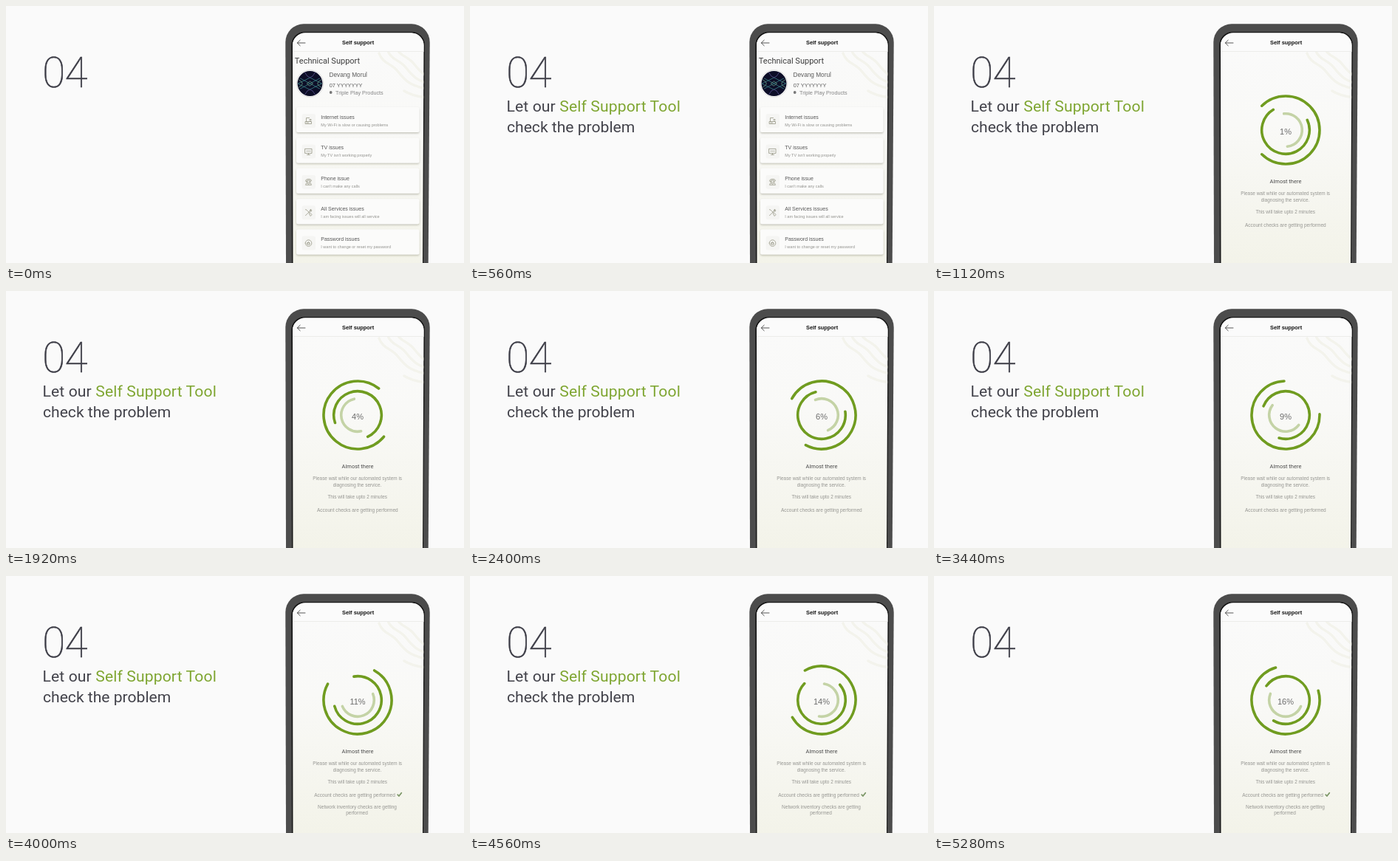
Recreate the animation shown at these times as an HTML page. Size 620x348 px, loop 5360 ms.

```html
<!DOCTYPE html>
<html lang="en">
<head>
<meta charset="utf-8">
<title>Self support</title>
<style>
  html, body { margin: 0; width: 100%; height: 100%; overflow: hidden; background: #fafafa; }
  svg { display: block; width: 620px; height: 348px; }
  .display { font-family: Roboto, sans-serif; }
  .ui { font-family: "Liberation Sans", Arial, sans-serif; }
  .mid { text-anchor: middle; }
  .line { fill: none; stroke-linecap: round; stroke-linejoin: round; }
</style>
</head>
<body>
<svg viewBox="0 0 620 348" xmlns="http://www.w3.org/2000/svg">
  <defs>
    <linearGradient id="paper" x1="0" y1="0" x2="0" y2="1">
      <stop offset="0" stop-color="#fafafa"/>
      <stop offset=".4" stop-color="#f9f9f7"/>
      <stop offset="1" stop-color="#f3f3e9"/>
    </linearGradient>
    <filter id="shadow" x="-10%" y="-20%" width="120%" height="160%">
      <feDropShadow dx="0" dy="1.4" stdDeviation="1.1" flood-color="#55553c" flood-opacity=".34"/>
    </filter>
    <clipPath id="screen"><path d="M388.500 348L388 53A17 17 0 0 1 405 36.500H549A17 17 0 0 1 565.500 53L564 348Z"/></clipPath>
  </defs>

  <text class="display" x="49.300" y="109.600" font-size="56.500" font-weight="100" letter-spacing="-.8" fill="#3c3c46" stroke="#3c3c46" stroke-width=".6">04</text>
  <g id="headline" class="display" font-size="21.100" fill="#43434b">
    <text x="49.500" y="142.500" letter-spacing=".13">Let our <tspan fill="#7fa632">Self Support Tool</tspan></text>
    <text x="50" y="170.500">check the problem</text>
  </g>

  <path d="M379 348L378.300 49A24.700 24.700 0 0 1 403 24.300H549A24.700 24.700 0 0 1 573.700 49L571.700 348Z" fill="#4c4c4c"/>
  <path d="M387 348L386.300 53A18 18 0 0 1 404.300 35H549A18 18 0 0 1 567 53L565 348Z" fill="#161616"/>
  <g clip-path="url(#screen)">
    <rect x="386" y="36" width="182" height="312" fill="url(#paper)"/>
    <g id="waves" class="line" stroke="#f3f3ec" stroke-width="3.400"></g>
    <g id="list"></g>
    <g id="progress">
      <path id="outer" class="line" stroke="#709c20" stroke-width="3.600"/>
      <path id="middle" class="line" stroke="#709c20" stroke-width="3.600"/>
      <path id="inner" class="line" stroke="#c4d3a6" stroke-width="3.600"/>
      <text id="percent" class="ui mid" x="476" y="174.200" font-size="11" fill="#6a6a6a"></text>
      <text class="display mid" x="476" y="240.400" font-size="7.500" fill="#4a4a4a">Almost there</text>
      <g class="ui mid" font-size="6.420" fill="#969692">
        <text x="475.700" y="256">Please wait while our automated system is</text>
        <text x="475.500" y="264.800">diagnosing the service.</text>
        <text x="475.700" y="280.500">This will take upto 2 minutes</text>
        <text id="account" y="298.500" font-size="6.520">Account checks are getting performed</text>
        <g id="network">
          <path class="line" d="M530.200 296.200L531.900 298L535.300 293.800" stroke="#7c9767" stroke-width="1.800"/>
          <text x="475.500" y="314.500" font-size="6.520">Network inventory checks are getting</text>
          <text x="475" y="323.300" font-size="6.520">performed</text>
        </g>
      </g>
    </g>
    <rect x="386" y="36" width="182" height="25.500" fill="#fbfbfb"/>
    <path d="M386 61.500H568" stroke="#ececea"/>
    <path class="line" d="M405 50H394.300M398.200 46.200L394.300 50L398.200 53.800" stroke="#444" stroke-width=".9"/>
    <text class="ui mid" x="476.600" y="52.200" font-size="7.400" font-weight="700" fill="#111">Self support</text>
  </g>
</svg>
<script>
const LOOP = 5360, STEP = 80;
const CENTER = { x: 476, y: 168 };
const SPIN = [[0, -1072], [1120, 180], [1920, 1074], [2880, 2133], [3440, 2833], [4560, 4155], [5280, 4978.5], [5360, 5070]];
const $ = id => document.getElementById(id);
const clamp01 = v => Math.min(1, Math.max(0, v));
const ramp = (t, from, to) => clamp01((t - from) / (to - from));
const easeOut = p => 1 - (1 - p) ** 3;

const ICONS = [
  "M-4 1H4V4H-4ZM-2.500 2.500H0M-3 1V-4H1M2.500 1V-2M1 -1.500Q2.500 -3 4 -1.500",
  "M-4.500 -3.500H4.500V2.500H-4.500ZM-2 4.500H2M0 2.500V4.500M-2.500 -.5H-1.500M-.5 -.5H.5M1.500 -.5H2.500",
  "M-4 -1.500Q-4 -4 0 -4T4 -1.500L2 -.8L1.500 -2.300H-1.500L-2 -.8ZM-1.500 -1L-4 4H4L1.500 -1M-1.300 1.700A1.300 1.300 0 1 0 1.300 1.700A1.300 1.300 0 1 0 -1.300 1.700",
  "M-4 4L2 -2M2 -2Q1 -4 3.500 -4.500L3 -3L4.500 -2.800Q4 -.5 2 -2M-4 -4L-2.500 -3.500L1 0M1 1L2 0L4.500 3L3 4.500Z",
  "M-4.300 0A4.300 4.300 0 1 0 4.300 0A4.300 4.300 0 1 0 -4.300 0M-1.600 -.3H1.600V2H-1.600ZM-1 -.3V-1Q0 -2.500 1 -1V-.3"
];
const ISSUES = [
  ["Internet issues", "My Wi-Fi is slow or causing problems"],
  ["TV issues", "My TV isn't working properly"],
  ["Phone issue", "I can't make any calls"],
  ["All Services issues", "I am facing issues will all service"],
  ["Password issues", "I want to change or reset my password"]
];

function card([title, note], i) {
  const y = 137 + i * 41.4;
  return `<rect x="393" y="${y}" width="166.500" height="34" rx="2.500" fill="#fbfbfa" filter="url(#shadow)"/>
    <rect x="400.500" y="${y + 9}" width="18.500" height="19" rx="3" fill="#f5f5f3"/>
    <path class="line" d="${ICONS[i]}" transform="translate(409.500 ${y + 18.5})" stroke="#92927f" stroke-width=".75"/>
    <text x="426.300" y="${y + 15.8}" font-size="7" fill="#565656">${title}</text>
    <text x="426.300" y="${y + 25.7}" font-size="5.520" fill="#92928e">${note}</text>`;
}

const avatar = `<circle cx="411.500" cy="105" r="18.300" fill="#fff" stroke="#d5d5d2" stroke-width=".8"/>
  <circle cx="411.500" cy="105" r="17" fill="#0d0e27"/>
  <g class="line" stroke-width=".8" transform="translate(411.500 105)">
    <path d="M-16 0L0 -8L16 0L0 8ZM-13 -7L13 7M13 -7L-13 7" stroke="#398086"/>
    <path d="M-7 -15Q0 -1 7 -15M-7 15Q0 1 7 15" stroke="#59518e"/>
    <path d="M-15 -5Q-5 0 -15 5M15 -5Q5 0 15 5M-4 0L0 -3L4 0L0 3Z" stroke="#6d9b83"/>
  </g>`;

$("list").innerHTML = `
  <text class="display" x="390.800" y="78" font-size="11" fill="#3d3d3d">Technical Support</text>${avatar}
  <g class="ui" fill="#5c5c5c">
    <text x="437.500" y="95.500" font-size="8.250">Devang Morul</text>
    <text x="437.700" y="109.700" font-size="7.400">07 YYYYYYY</text>
    <circle cx="439.700" cy="117" r="1.900" fill="#777"/>
    <text x="446" y="119.800" font-size="7.270" fill="#858585">Triple Play Products</text>
    ${ISSUES.map(card).join("")}
  </g>`;

$("waves").innerHTML = [0, 1, 2].map(i =>
  `<path d="M505 64C510 78 522 78 530 88S545 108 570 112" transform="translate(${i * 11} ${i * -5})"/>`
).join("") + `<path d="M539 115Q550 122 570 124"/>`;

function arc(radius, from, to) {
  const point = deg => {
    const a = deg * Math.PI / 180;
    return `${CENTER.x + radius * Math.cos(a)} ${CENTER.y + radius * Math.sin(a)}`;
  };
  return `M${point(from)}A${radius} ${radius} 0 ${to - from > 180 ? 1 : 0} 1 ${point(to)}`;
}

function spinAt(t) {
  const i = SPIN.findIndex(([time]) => time > t);
  const [t0, a0] = SPIN[i - 1], [t1, a1] = SPIN[i];
  return a0 + (a1 - a0) * (t - t0) / (t1 - t0);
}

function render(t) {
  const enter = easeOut(ramp(t, 80, 600));
  const leave = ramp(t, 4960, 5280);
  $("headline").setAttribute("transform", `translate(0 ${10 * (1 - enter) - 8 * leave * leave})`);
  $("headline").setAttribute("opacity", enter * (1 - leave));

  const swap = ramp(t, 680, 960);
  $("list").setAttribute("opacity", 1 - swap);
  $("progress").setAttribute("opacity", swap);

  const spin = spinAt(t);
  $("outer").setAttribute("d", arc(46, spin + 45.5, spin + 314.5));
  $("middle").setAttribute("d", arc(32.3, 107 - spin + 48, 107 - spin + 312));
  $("inner").setAttribute("d", arc(22.3, spin + 84, spin + 264));
  $("percent").textContent = Math.max(1, Math.floor(1.6 + (t - 1120) * 0.003605)) + "%";

  const checked = t >= 3760;
  $("account").setAttribute("x", checked ? 472 : 475.8);
  $("network").setAttribute("opacity", checked ? 1 : 0);
}

const start = performance.now();
function tick() {
  const t = (performance.now() - start) % LOOP;
  render(Math.floor(t / STEP) * STEP);
  requestAnimationFrame(tick);
}
render(0);
requestAnimationFrame(tick);
</script>
</body>
</html>
```
